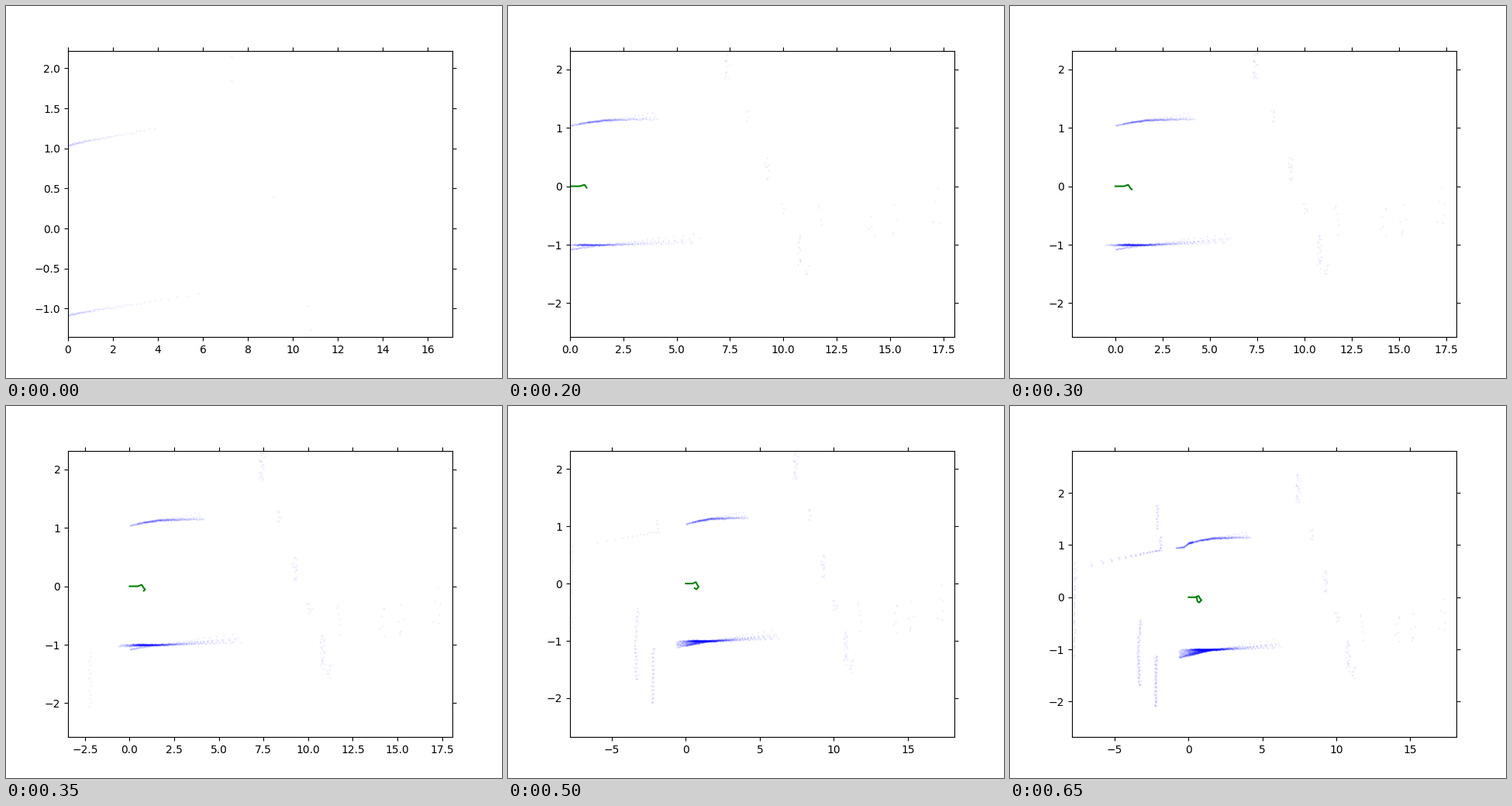
A matplotlib script that plays this animation: 640x480 px, repeating every 0.7 s.

```python
import numpy as np
import matplotlib.pyplot as plt
from matplotlib.animation import FuncAnimation

FRAMES, STEP_MS = 14, 50
rng = np.random.default_rng(4)

# Robot position at each scan, from a few waypoints
STEPS = np.arange(FRAMES)
WAY_K = [0, 1, 2, 4, 6, 8, 10, 13]
PATH = np.column_stack([
    np.interp(STEPS, WAY_K, [0, .45, .68, .78, .87, .72, .6, .55]),
    np.interp(STEPS, WAY_K, [0, 0, .025, -.025, -.055, -.1, -.08, 0])])

# Slats of the far fence: x and echoes per scan
FENCE = [(7.4, 3), (8.35, 1), (9.27, 2), (10.05, 1), (10.8, 3), (11.15, 1)]

# Lone objects beyond the fence
FAR = [(11.62, -.55), (14.15, -.65), (15.2, -.6), (17.2, -.35)]

# Surfaces behind the robot: x0, y0, x1, y1, points, first scan
REAR = [(-2.22, -1.1, -2.26, -2.1, 14, 7),
        (-3.25, -.42, -3.45, -1.1, 8, 8),
        (-3.45, -1.1, -3.3, -1.7, 9, 8),
        (-7.74, .68, -7.76, -1.15, 11, 9),
        (-1.9, .89, -1.9, 1.17, 4, 10),
        (-2.12, 1.28, -2.12, 1.77, 8, 11)]


def beams(k, left, right):
    """x where one-degree beams meet a wall beside the robot."""
    phase = rng.random() if k else .5
    x = PATH[k, 0] + 1.07 * np.tan(np.radians(np.arange(-89, 89) + phase))
    return x[(x >= left) & (x <= right)]


def noisy(x, y):
    return np.column_stack([x, y + rng.normal(0, .006, len(x))])


def upper_wall(k):
    # In view ahead at first, lost during the turn, then in view behind
    if k < 7:
        x = beams(k, .4 * k, 4 + .04 * k)
    elif k > 10:
        x = beams(k, -.88, .3)
    else:
        x = np.empty(0)
    end = 1.15 + .12 * np.exp(-k)
    return noisy(x, np.interp(x, [-.9, -.35, 0, .8, 1.6, 4.2],
                              [.95, .96, 1.04, 1.095, 1.133, end]))


def lower_wall(k):
    left = np.interp(k, [0, 1, 4, 6, 8], [0, .5, 0, -.6, -.66])
    right = 5.9 + .06 * k if k < 9 else 3.4 - .35 * (k - 9)
    x = beams(k, left, right)
    if k == 0:
        return noisy(x, -1.075 + .046 * x)
    tilt = np.clip((k - 6) * .0125, 0, .068)
    rise = .01 + .009 * ((k - 1) % 3)
    return noisy(x, -1 + tilt * np.minimum(x - 1.6, 0)
                 + rise * np.maximum(x - 1.8, 0))


def rear_wall(k):
    x = beams(k, -6.75, -1.9)
    return noisy(x, .91 + (.048 + .006 * (k - 10)) * (x + 1.9))


def strip(x0, y0, x1, y1, n):
    t = (np.arange(n) + rng.random()) / max(n, 1)
    x = x0 + (x1 - x0) * t + rng.normal(0, .05, n)
    return np.column_stack([x, y0 + (y1 - y0) * t])


def fence(k):
    slats = []
    for x, n in FENCE:
        y = np.interp(x, [7.4, 11.15], [2.08, -1.45])
        half = .03 + .09 * n
        x += .03 * (k - 4)
        slats.append(strip(x, y + half, x, y - half, n - (k == 0)))
    return slats


def scan(k):
    parts = [upper_wall(k), lower_wall(k)]
    if k < 8:
        parts += fence(k)
    if 0 < k < 7:
        parts.append(FAR + rng.normal(0, (.12, .2), (len(FAR), 2)))
    if k >= 10:
        parts.append(rear_wall(k))
    parts += [strip(*line) for *line, first in REAR if k >= first]
    return np.vstack(parts)


SCANS = [scan(k) for k in range(FRAMES)]


def limits(k):
    left = np.interp(k, [4, 5, 6, 7, 8, 10, 13],
                     [0, -.35, -2.29, -3.45, -7.71, -7.82, -7.895])
    right = np.interp(k, [0, 1, 2, 4, 6, 8],
                      [17.09, 17.98, 17.99, 18.02, 18.02, 18.14])
    low = -1.355 if k == 0 else -2.58 if k < 8 else -2.68
    high = 2.22 if k == 0 else 2.32 if k < 11 else 2.81
    return (left, right), (low, high)


fig, ax = plt.subplots(figsize=(6.4, 4.8), dpi=100)
ax.tick_params(top=True, right=True)
cloud, = ax.plot([], [], "bx", markersize=1, alpha=.07)
track, = ax.plot([], [], "g-", lw=1.5)


def draw(k):
    cloud.set_data(*np.vstack(SCANS[:k + 1]).T)
    track.set_data(*PATH[:k + 1].T)
    xlim, ylim = limits(k)
    ax.set_xlim(xlim)
    ax.set_ylim(ylim)
    return cloud, track


anim = FuncAnimation(fig, draw, frames=FRAMES, interval=STEP_MS,
                     init_func=lambda: draw(0), repeat=True, repeat_delay=0)
plt.show()
```
